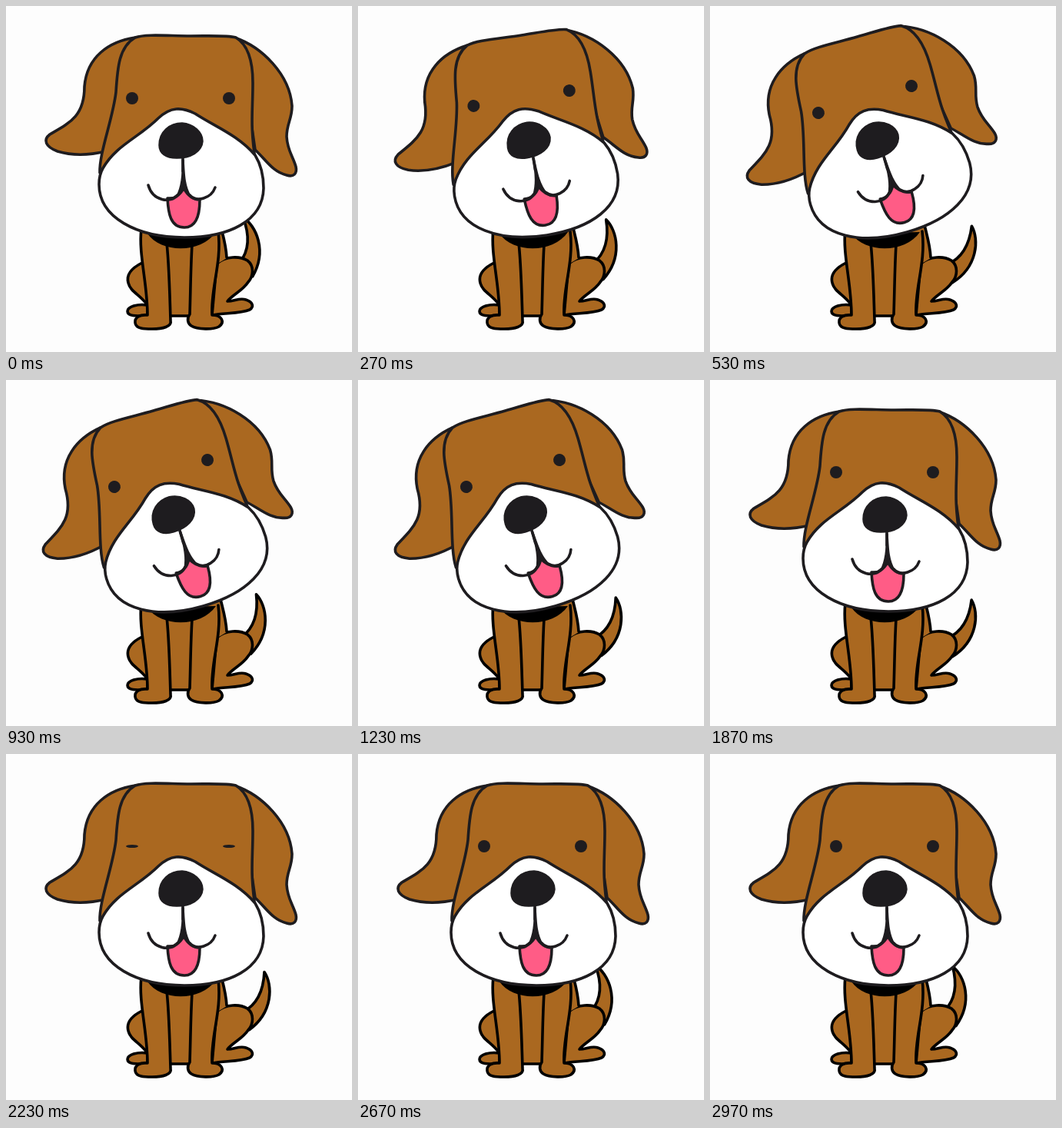
These frames come from a looping animation (450 by 450 pixels, 3010 ms). An HTML page:

```html
<!DOCTYPE html>
<html lang="en">
<head>
<meta charset="utf-8">
<title>Puppy</title>
<style>
  html, body { margin: 0; width: 100%; height: 100%; overflow: hidden; background: #fdfdfd; }
  svg { display: block; width: 100vw; height: 100vh; }
  .line { fill: none; }
  .fur { fill: #aa6820; }
  .white { fill: #fff; }
  .ink { fill: #1e1c1f; }
  #body { stroke: #000; }
  #head { stroke: #1e1c1f; }
</style>
</head>
<body>
<svg viewBox="0 0 450 450" stroke-width="3.6" stroke-linecap="round" stroke-linejoin="round">
  <g id="body">
    <path id="tail" class="fur" d="M333 282C345 298 347 334 317 358L300 352L308 335C325 325 333 306 333 282Z"/>

    <!-- hind legs -->
    <path class="fur" d="M184 389C171 387 158 391 158 397C158 403 168 404 184 402Z"/>
    <path class="fur" d="M177 334C163 341 156 349 159 360C162 372 174 375 184 389L195 360Z"/>
    <path class="fur" d="M274 335C286 325 304 325 314 331C323 338 322 351 315 359C308 370 294 376 288 384C297 384 304 379 312 382C321 385 323 391 317 395C305 400 286 399 268 402Z"/>

    <!-- torso and front legs -->
    <path class="fur" stroke="none" d="M176 285C176 322 182 350 184 403H268C266 372 274 345 277 334L287 328L279 285Z"/>
    <path class="line" d="M279 285C282 298 286 310 287 327M213 403H239"/>
    <path class="fur" d="M176 290C172 322 184 360 184 402C174 401 167 405 168 412C169 420 180 420 190 420C204 420 216 417 214 409C213 372 212 335 209 308"/>
    <path class="fur" d="M242 310C240 345 240 373 239 401C235 406 236 413 241 416C249 421 270 421 277 417C285 411 281 402 268 402C266 366 281 335 276 293"/>
    <path d="M184 296C202 322 254 322 273 294Z" stroke="none"/>
  </g>

  <g id="head">
    <path class="fur" d="M168 41C134 46 105 66 102 105C102 143 83 152 57 167C48 174 51 183 67 189C90 196 113 193 130 189L160 90Z"/>
    <path class="fur" d="M297 41C333 53 369 89 372 130C372 147 365 153 365 170C366 188 373 195 377 209C379 218 374 223 365 220C347 216 338 200 324 187L310 90Z"/>
    <path class="fur" d="M122 217C121 191 139 147 143 112C145 80 147 53 168 41C182 36 212 39 240 39C268 39 288 38 299 41C314 50 321 72 321 100C321 140 317 155 325 205Z"/>
    <path class="white" d="M126 211C143 181 173 171 198 146C214 131 228 131 246 140C272 157 302 168 324 194C332 207 335 220 335 237C334 280 290 301 232 301C170 301 121 275 121 232C121 224 122 218 126 211Z"/>
    <path class="ink" d="M199 181C199 163 213 152 229 152C244 153 256 164 256 176C255 190 240 198 222 198C208 198 199 192 199 181Z" stroke-width="1.5"/>
    <path fill="#ff5c86" d="M231 237C226 247 218 251 210 250C211 270 214 288 232 288C248 288 252 270 252 252C243 252 236 246 231 237Z"/>
    <path class="line" d="M230 197V215M185 233C191 254 214 257 223 246M239 246C248 256 267 250 272 236"/>
    <path class="ink" stroke-width="1.5" d="M229 200C230 218 229 234 222 247L231 237L240 247C232 234 232 218 231 200Z"/>
    <ellipse class="ink eye" cx="164" cy="120" rx="8" ry="8" stroke="none"/>
    <ellipse class="ink eye" cx="290" cy="120" rx="8" ry="8" stroke="none"/>
  </g>
</svg>
<script>
const LOOP = 3010;
const WAGS = 9;
const TILT = -16.1;
const EYE = 8;

const head = document.getElementById("head");
const tail = document.getElementById("tail");
const eyes = document.querySelectorAll(".eye");

// Smooth 0..1 ramp between two times
function ease(t, from, to) {
  const p = Math.min(1, Math.max(0, (t - from) / (to - from)));
  return p * p * (3 - 2 * p);
}

function rotate(node, angle, x, y) {
  node.setAttribute("transform", `rotate(${angle.toFixed(3)} ${x} ${y})`);
}

function draw(t) {
  const tilt = ease(t, 0, 500) - ease(t, 1300, 1800);
  rotate(head, TILT * tilt, 219.6, 211);

  const phase = t / LOOP * WAGS - 0.035;
  rotate(tail, -6.8 - 14.5 * Math.cos(2 * Math.PI * phase), 302, 345);

  const blink = ease(t, 2100, 2220) - ease(t, 2260, 2380);
  eyes.forEach(eye => eye.setAttribute("ry", EYE * (1 - 0.74 * blink)));
}

const start = performance.now();
function frame() {
  draw((performance.now() - start) % LOOP);
  requestAnimationFrame(frame);
}
draw(0);
requestAnimationFrame(frame);
</script>
</body>
</html>
```
